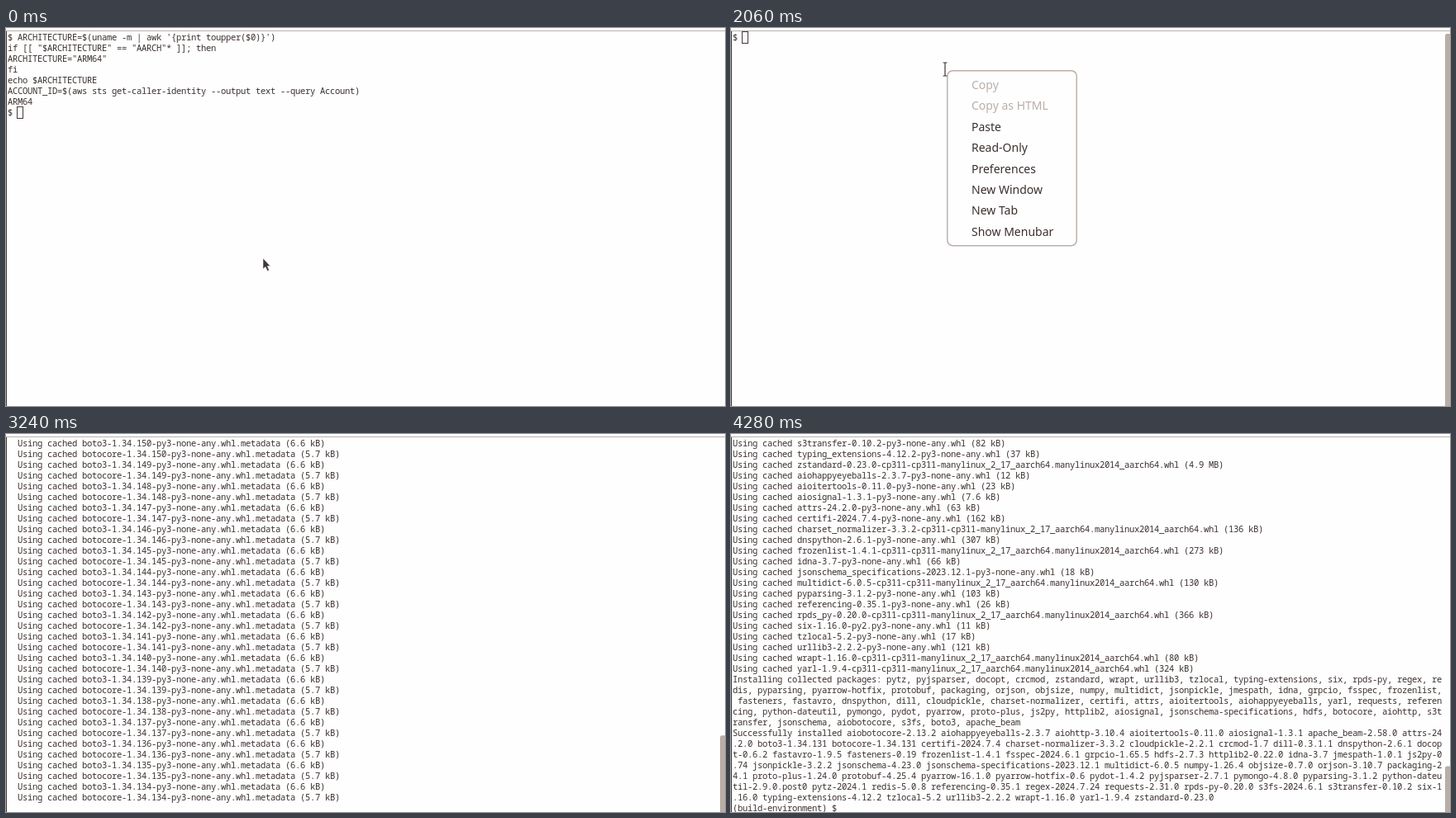
Write an HTML page that moves like this. It is 870 px wide and 458 px high and loops after 4.3 s.

```html
<!DOCTYPE html>
<html lang="en">
<head>
<meta charset="utf-8">
<title>Terminal session</title>
<style>
  html, body { margin: 0; width: 100%; height: 100%; overflow: hidden; background: #fefefe; }
  svg { display: block; width: 870px; height: 458px; }
  text { white-space: pre; fill: #3b302d; }
  #rows text { font: 10.5px "Noto Sans Mono", "DejaVu Sans Mono", monospace; letter-spacing: -.3px; }
  #menu text { font: 14px "Noto Sans", "Open Sans", sans-serif; }
  #menu .off { fill: #b9aea8; }
</style>
</head>
<body>
<svg id="stage" viewBox="0 0 870 458">
  <rect width="870" height="458" fill="#fefefe"/>
  <rect y="3" width="870" height="1" fill="#b9b2ae"/>
  <rect y="4" width="1" height="454" fill="#453d3b"/>
  <rect id="cursor" stroke="#453b38"/>
  <g id="rows"></g>
  <rect id="thumb" x="864" width="8" rx="2.5" fill="#b9aea7"/>
  <g id="menu">
    <rect x=".75" y=".75" width="156.5" height="212" rx="6.5" fill="#fefefe" stroke="#bdb1a9" stroke-width="1.5"/>
  </g>
  <path id="arrow" d="M0 0v13l3-2.6 2.3 5 2.2-1-2.2-4.8h3.6z" fill="#3f3735" stroke="#fefefe" stroke-width=".5"/>
  <path id="beam" d="M-2.5-8h2l.5.7.5-.7h2M0-7.5v15M-2.5 8h2l.5-.7.5.7h2" fill="none" stroke="#3f3735" stroke-width="1.2"/>
</svg>
<script>
const LOOP = 4300, ROWS = 35, COLS = 143, CHAR = 6, LINE = 13;
const NS = "http://www.w3.org/2000/svg";
const $ = id => document.getElementById(id);

function addText(parent, x, y, content = "", cls = "") {
  const el = document.createElementNS(NS, "text");
  el.setAttribute("x", x);
  el.setAttribute("y", y);
  el.setAttribute("class", cls);
  el.textContent = content;
  return parent.appendChild(el);
}

function set(el, attrs) {
  for (const key in attrs) el.setAttribute(key, attrs[key]);
}

const show = (el, on) => el.setAttribute("visibility", on ? "visible" : "hidden");

// Linear keyframes: [time, value, value, ...]
function tween(keys, t) {
  const next = keys.findIndex(k => k[0] > t);
  if (next < 0) return keys[keys.length - 1].slice(1);
  if (next === 0) return keys[0].slice(1);
  const a = keys[next - 1], b = keys[next];
  const p = (t - a[0]) / (b[0] - a[0]);
  return a.slice(1).map((v, i) => v + (b[i + 1] - v) * p);
}

// ---- Terminal text ----
const session = `$ ARCHITECTURE=$(uname -m | awk '{print toupper($0)}')
if [[ "$ARCHITECTURE" == "AARCH"* ]]; then
ARCHITECTURE="ARM64"
fi
echo $ARCHITECTURE
ACCOUNT_ID=$(aws sts get-caller-identity --output text --query Account)
ARM64`.split("\n");

const bucket = ["$ mkdir beam-demo && cd beam-demo",
  "aws s3 mb s3://${ACCOUNT_ID}-beam-blog-bucket --region us-east-1"];

const log = [];
const BEAM = "apache_beam==2.58.0";
const items = list => list.trim().split("\n");

// "~" and "@" abbreviate the two common wheel suffixes.
function print(line) {
  line = line.replace("~", "-py3-none-any.whl")
    .replace("@", "-cp311-cp311-manylinux_2_17_aarch64.manylinux2014_aarch64.whl");
  for (let i = 0; i < line.length; i += COLS) log.push(line.slice(i, i + COLS));
}

function metadata(file, size) {
  const sdist = file.endsWith(".tar.gz");
  print(`  Using cached ${file}${sdist ? "" : ".metadata"} (${size})`);
  if (sdist) print("  Preparing metadata (setup.py) ... done");
}

function collect(parent, list) {
  for (const item of items(list)) {
    const [req, file, ...size] = item.split(" ");
    print(`Collecting ${req} (from ${parent})`);
    metadata(file, size.join(" "));
  }
}

function wheels(list) {
  for (const item of items(list)) print("Using cached " + item.replace(" ", " (") + ")");
}

items(String.raw`$ python3 -m venv build-environment && \
source build-environment/bin/activate && \
python3 -m pip install --upgrade pip && \
python3 -m pip install apache_beam==2.58.0 \
    s3fs \
    boto3
Requirement already satisfied: pip in ./build-environment/lib/python3.11/site-packages (22.3.1)
Collecting pip
  Using cached pip-24.2~ (1.8 MB)
Installing collected packages: pip
  Attempting uninstall: pip
    Found existing installation: pip 22.3.1
    Uninstalling pip-22.3.1:
      Successfully uninstalled pip-22.3.1
Successfully installed pip-24.2
Collecting apache_beam==2.58.0
  Using cached apache_beam-2.58.0@.metadata (7.7 kB)
Collecting s3fs
  Using cached s3fs-2024.6.1~.metadata (1.6 kB)`).forEach(print);
const startedAt = log.length;

print("Collecting boto3");
metadata("boto3-1.35.0~", "6.6 kB");
collect(BEAM, `
crcmod<2.0,>=1.7 crcmod-1.7.tar.gz 89 kB
orjson<4,>=3.9.7 orjson-3.10.7@ 50 kB
dill<0.3.2,>=0.3.1.1 dill-0.3.1.1.tar.gz 151 kB
cloudpickle~=2.2.1 cloudpickle-2.2.1~ 6.9 kB
fastavro<2,>=0.23.6 fastavro-1.9.5@ 5.5 kB
fasteners<1.0,>=0.3 fasteners-0.19~ 4.9 kB
grpcio<1.66.0,>=1.33.1 grpcio-1.65.5@ 3.3 kB
hdfs<3.0.0,>=2.1.0 hdfs-2.7.3.tar.gz 43 kB
httplib2<0.23.0,>=0.8 httplib2-0.22.0~ 2.6 kB
jsonschema<5.0.0,>=4.0.0 jsonschema-4.23.0~ 7.9 kB
jsonpickle<4.0.0,>=3.0.0 jsonpickle-3.2.2~ 7.2 kB
numpy<1.27.0,>=1.14.3 numpy-1.26.4@ 62 kB
objsize<0.8.0,>=0.6.1 objsize-0.7.0~ 12 kB
packaging>=22.0 packaging-24.1~ 3.2 kB
pymongo<5.0.0,>=3.8.0 pymongo-4.8.0@ 22 kB
proto-plus<2,>=1.7.1 proto_plus-1.24.0~ 2.2 kB
protobuf<4.26.0,>=3.20.3 protobuf-4.25.4-cp37-abi3-manylinux2014_aarch64.whl 541 bytes
pydot<2,>=1.2.0 pydot-1.4.2-py2.py3-none-any.whl 8.0 kB
python-dateutil<3,>=2.8.0 python_dateutil-2.9.0.post0-py2.py3-none-any.whl 8.4 kB
pytz>=2018.3 pytz-2024.1-py2.py3-none-any.whl 22 kB
redis<6,>=5.0.0 redis-5.0.8~ 9.2 kB
regex>=2020.6.8 regex-2024.7.24@ 40 kB
requests!=2.32.*,<3.0.0,>=2.24.0 requests-2.31.0~ 4.6 kB
typing-extensions>=3.7.0 typing_extensions-4.12.2~ 3.0 kB
zstandard<1,>=0.18.0 zstandard-0.23.0@ 3.0 kB
pyarrow<17.0.0,>=3.0.0 pyarrow-16.1.0-cp311-cp311-manylinux_2_28_aarch64.whl 3.0 kB
pyarrow-hotfix<1 pyarrow_hotfix-0.6~ 3.6 kB
js2py<1,>=0.74 Js2Py-0.74~ 868 bytes`);
collect("s3fs", `
aiobotocore<3.0.0,>=2.5.4 aiobotocore-2.13.2~ 22 kB
fsspec==2024.6.1.* fsspec-2024.6.1~ 11 kB
aiohttp!=4.0.0a0,!=4.0.0a1 aiohttp-3.10.4@ 7.5 kB`);
collect("boto3", `
botocore<1.36.0,>=1.35.0 botocore-1.35.0~ 5.7 kB
jmespath<2.0.0,>=0.7.1 jmespath-1.0.1~ 7.6 kB
s3transfer<0.11.0,>=0.10.0 s3transfer-0.10.2~ 1.7 kB`);
const looking = name => print(`INFO: pip is looking at multiple versions of ${name} to determine which version is compatible with other requirements. This could take a while.`);
looking("aiobotocore");
collect("s3fs", "aiobotocore<3.0.0,>=2.5.4 aiobotocore-2.13.1~ 22 kB");
metadata("aiobotocore-2.13.0~", "21 kB");
const conflictAt = log.length;

for (const v of "12.4 12.3 12.2 12.1 12.0 11.2 11.1 11.0 10.0 9.1 9.0 8.0 7.0 6.0 5.4".split(" "))
  metadata(`aiobotocore-2.${v}~`, "20 kB");
print("Collecting boto3");
for (let v = 161; v > 130; v--) {
  metadata(`boto3-1.34.${v}~`, "6.6 kB");
  metadata(`botocore-1.34.${v}~`, "5.7 kB");
}
collect("aiohttp!=4.0.0a0,!=4.0.0a1->s3fs", `
aiohappyeyeballs>=2.3.0 aiohappyeyeballs-2.3.7~ 5.6 kB
aiosignal>=1.1.2 aiosignal-1.3.1~ 4.0 kB
attrs>=17.3.0 attrs-24.2.0~ 11 kB
frozenlist>=1.1.1 frozenlist-1.4.1@ 12 kB
multidict<7.0,>=4.5 multidict-6.0.5@ 4.2 kB
yarl<2.0,>=1.0 yarl-1.9.4@ 31 kB`);
collect("aiobotocore<3.0.0,>=2.5.4->s3fs", `
wrapt<2.0.0,>=1.10.10 wrapt-1.16.0@ 6.6 kB
aioitertools<1.0.0,>=0.5.1 aioitertools-0.11.0~ 3.3 kB`);
collect("botocore<1.35.0,>=1.34.131->boto3", "urllib3!=2.2.0,<3,>=1.25.4 urllib3-2.2.2~ 6.4 kB");
collect("hdfs<3.0.0,>=2.1.0->" + BEAM, `
docopt docopt-0.6.2.tar.gz 25 kB
six>=1.9.0 six-1.16.0-py2.py3-none-any.whl 1.8 kB`);
collect("httplib2<0.23.0,>=0.8->" + BEAM, "pyparsing<4,>=2.4.2 pyparsing-3.1.2~ 5.1 kB");
collect("js2py<1,>=0.74->" + BEAM, `
tzlocal>=1.2 tzlocal-5.2~ 7.8 kB
pyjsparser>=2.5.1 pyjsparser-2.7.1.tar.gz 24 kB`);
collect("jsonschema<5.0.0,>=4.0.0->" + BEAM, `
jsonschema-specifications>=2023.03.6 jsonschema_specifications-2023.12.1~ 3.0 kB
referencing>=0.28.4 referencing-0.35.1~ 2.8 kB
rpds-py>=0.7.1 rpds_py-0.20.0@ 4.2 kB`);
collect("pymongo<5.0.0,>=3.8.0->" + BEAM, "dnspython<3.0.0,>=1.16.0 dnspython-2.6.1~ 5.8 kB");
collect("requests!=2.32.*,<3.0.0,>=2.24.0->" + BEAM, `
charset-normalizer<4,>=2 charset_normalizer-3.3.2@ 33 kB
idna<4,>=2.5 idna-3.7~ 9.9 kB
certifi>=2017.4.17 certifi-2024.7.4~ 2.2 kB`);

wheels(`
apache_beam-2.58.0@ 15.5 MB
s3fs-2024.6.1~ 29 kB
fsspec-2024.6.1~ 177 kB
boto3-1.34.131~ 139 kB
aiobotocore-2.13.2~ 77 kB
botocore-1.34.131~ 12.3 MB
aiohttp-3.10.4@ 1.3 MB
cloudpickle-2.2.1~ 25 kB
fastavro-1.9.5@ 3.3 MB
fasteners-0.19~ 18 kB
grpcio-1.65.5@ 5.4 MB
httplib2-0.22.0~ 96 kB
jmespath-1.0.1~ 20 kB
Js2Py-0.74~ 1.0 MB
jsonpickle-3.2.2~ 41 kB
jsonschema-4.23.0~ 88 kB
numpy-1.26.4@ 14.2 MB
objsize-0.7.0~ 11 kB
orjson-3.10.7@ 148 kB
packaging-24.1~ 53 kB
proto_plus-1.24.0~ 50 kB
protobuf-4.25.4-cp37-abi3-manylinux2014_aarch64.whl 293 kB
pyarrow-16.1.0-cp311-cp311-manylinux_2_28_aarch64.whl 38.1 MB`);
const cachedAt = log.length;

wheels(`
pyarrow_hotfix-0.6~ 7.9 kB
pydot-1.4.2-py2.py3-none-any.whl 21 kB
pymongo-4.8.0@ 1.2 MB
python_dateutil-2.9.0.post0-py2.py3-none-any.whl 229 kB
pytz-2024.1-py2.py3-none-any.whl 505 kB
redis-5.0.8~ 255 kB
regex-2024.7.24@ 793 kB
requests-2.31.0~ 62 kB
s3transfer-0.10.2~ 82 kB
typing_extensions-4.12.2~ 37 kB
zstandard-0.23.0@ 4.9 MB
aiohappyeyeballs-2.3.7~ 12 kB
aioitertools-0.11.0~ 23 kB
aiosignal-1.3.1~ 7.6 kB
attrs-24.2.0~ 63 kB
certifi-2024.7.4~ 162 kB
charset_normalizer-3.3.2@ 136 kB
dnspython-2.6.1~ 307 kB
frozenlist-1.4.1@ 273 kB
idna-3.7~ 66 kB
jsonschema_specifications-2023.12.1~ 18 kB
multidict-6.0.5@ 130 kB
pyparsing-3.1.2~ 103 kB
referencing-0.35.1~ 26 kB
rpds_py-0.20.0@ 366 kB
six-1.16.0-py2.py3-none-any.whl 11 kB
tzlocal-5.2~ 17 kB
urllib3-2.2.2~ 121 kB
wrapt-1.16.0@ 80 kB
yarl-1.9.4@ 324 kB`);
print("Installing collected packages: pytz, pyjsparser, docopt, crcmod, zstandard, wrapt, urllib3, tzlocal, typing-extensions, six, rpds-py, regex, redis, pyparsing, pyarrow-hotfix, protobuf, packaging, orjson, objsize, numpy, multidict, jsonpickle, jmespath, idna, grpcio, fsspec, frozenlist, fasteners, fastavro, dnspython, dill, cloudpickle, charset-normalizer, certifi, attrs, aioitertools, aiohappyeyeballs, yarl, requests, referencing, python-dateutil, pymongo, pydot, pyarrow, proto-plus, js2py, httplib2, aiosignal, jsonschema-specifications, hdfs, botocore, aiohttp, s3transfer, jsonschema, aiobotocore, s3fs, boto3, apache_beam");
const installingAt = log.length;
print("Successfully installed aiobotocore-2.13.2 aiohappyeyeballs-2.3.7 aiohttp-3.10.4 aioitertools-0.11.0 aiosignal-1.3.1 apache_beam-2.58.0 attrs-24.2.0 boto3-1.34.131 botocore-1.34.131 certifi-2024.7.4 charset-normalizer-3.3.2 cloudpickle-2.2.1 crcmod-1.7 dill-0.3.1.1 dnspython-2.6.1 docopt-0.6.2 fastavro-1.9.5 fasteners-0.19 frozenlist-1.4.1 fsspec-2024.6.1 grpcio-1.65.5 hdfs-2.7.3 httplib2-0.22.0 idna-3.7 jmespath-1.0.1 js2py-0.74 jsonpickle-3.2.2 jsonschema-4.23.0 jsonschema-specifications-2023.12.1 multidict-6.0.5 numpy-1.26.4 objsize-0.7.0 orjson-3.10.7 packaging-24.1 proto-plus-1.24.0 protobuf-4.25.4 pyarrow-16.1.0 pyarrow-hotfix-0.6 pydot-1.4.2 pyjsparser-2.7.1 pymongo-4.8.0 pyparsing-3.1.2 python-dateutil-2.9.0.post0 pytz-2024.1 redis-5.0.8 referencing-0.35.1 regex-2024.7.24 requests-2.31.0 rpds-py-0.20.0 s3fs-2024.6.1 s3transfer-0.10.2 six-1.16.0 typing-extensions-4.12.2 tzlocal-5.2 urllib3-2.2.2 wrapt-1.16.0 yarl-1.9.4 zstandard-0.23.0");

// ---- Timeline ----
const printed = [[2300, 6], [2640, 6], [2700, 9], [2820, 15], [2860, startedAt], [2880, startedAt],
  [3120, conflictAt], [3360, cachedAt], [3460, installingAt]];
const pointerPath = [[20, 311, 279], [300, 307, 279], [460, 307, 279], [680, 330, 347],
  [1700, 330, 347], [1960, 259, 50], [2080, 259, 50], [2200, 310, 119]];
const menus = [{ from: 400, to: 740, x: 309, y: 280 }, { from: 1980, to: 2220, x: 261, y: 51 }];

// The cursor sits after the last line returned.
function screen(t) {
  if (t < 740) return [...session, "$ "];
  if (t < 1060) return [...session, ...bucket];
  if (t < 1420) return [...session, ...bucket, ""];
  if (t < 1600) return [...session, ...bucket, "$ " + "clear".slice(0, Math.max(0, (t - 1440) / 20))];
  if (t < 2220) return ["$ "];
  if (t < 2300) return log.slice(0, 6);
  if (t < 4100) return [...log.slice(0, Math.floor(tween(printed, t)[0])), ""];
  return [...log, "(build-environment) $ "];
}

// ---- Drawing ----
const rowEls = Array.from({ length: ROWS }, (_, i) => addText($("rows"), 2, 15 + i * LINE));
["Copy", "Copy as HTML", "Paste", "Read-Only", "Preferences", "New Window", "New Tab", "Show Menubar"]
  .forEach((label, i) => addText($("menu"), 30, 23 + i * 25.4, label, i < 2 ? "off" : ""));

function render(t) {
  const lines = screen(t);
  const visible = lines.slice(-ROWS);
  rowEls.forEach((el, i) => {
    const line = visible[i] || "";
    if (el.textContent !== line) el.textContent = line;
  });

  const menu = menus.find(m => t >= m.from && t < m.to);
  const hollow = t < 60 || menu;
  const row = visible.length - 1;
  const x = 2 + visible[row].length * CHAR, y = 5 + row * LINE;
  set($("cursor"), hollow
    ? { x: x - .5, y: y - .5, width: 7, height: 14, fill: "none", "stroke-width": 1 }
    : { x, y, width: CHAR, height: LINE, fill: "#453b38", "stroke-width": 0 });
  show($("cursor"), t < 2860 || (t - 2860) % 480 < 240);

  const thumb = 451 * Math.min(1, ROWS / lines.length);
  set($("thumb"), { y: 458 - thumb, height: thumb + 4 });
  show($("thumb"), t >= 60);

  show($("menu"), menu);
  if (menu) set($("menu"), { transform: `translate(${menu.x} ${menu.y})` });

  const [px, py] = tween(pointerPath, t);
  const pointer = t < 1060 || (t >= 1700 && t < 2300);
  const overMenu = menu && px > menu.x && py > menu.y;
  const arrow = t < 60 || overMenu;
  for (const id of ["arrow", "beam"]) {
    set($(id), { transform: `translate(${px} ${py})` });
    show($(id), pointer && (id === "arrow") === Boolean(arrow));
  }
}

function frame() {
  render(Math.floor(performance.now() % LOOP / 20) * 20);
  requestAnimationFrame(frame);
}
frame();
</script>
</body>
</html>
```
